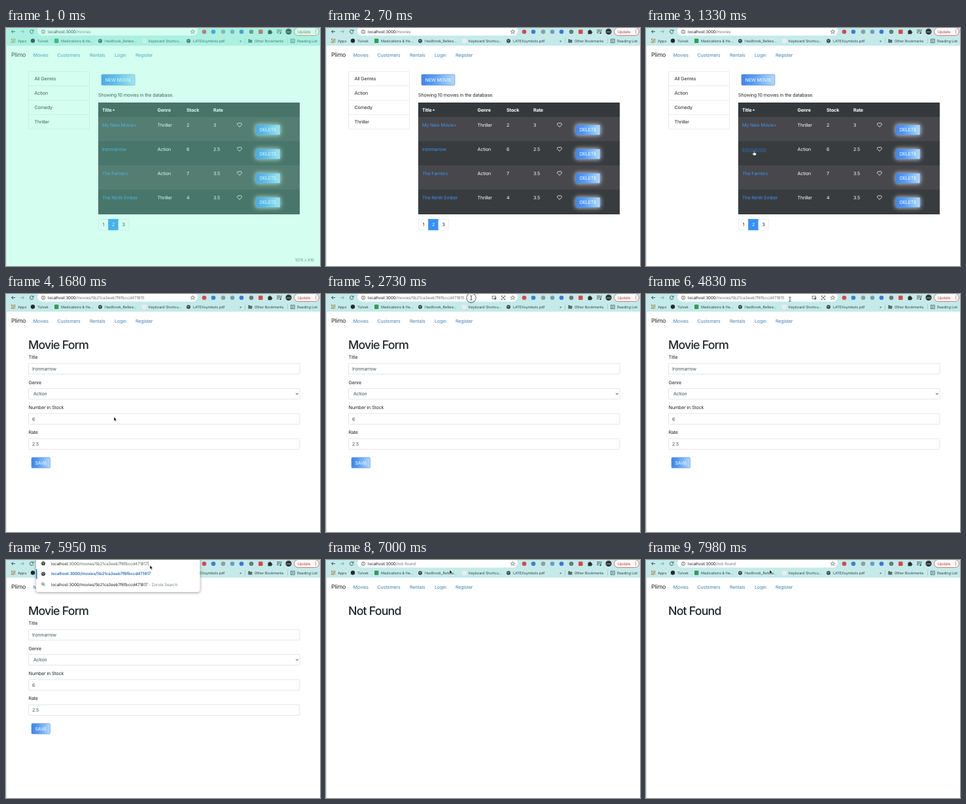
Animation, 480 px wide and 364 px high, one loop 8 s. Source, as an HTML page:

```html
<!DOCTYPE html>
<html lang="en">
<head>
<meta charset="utf-8">
<title>Movie list</title>
<style>
html, body { margin: 0; width: 100%; height: 100%; overflow: hidden; background: #fff; }
svg { display: block; width: 480px; height: 364px; }
text { font: 7.14px Inter, "Open Sans", sans-serif; letter-spacing: -.022em; fill: #212529; white-space: pre; text-rendering: geometricPrecision; }
.url { font-size: 6.3px; }
.mark { font-size: 5.64px; fill: #3c4a4d; }
.brand { font-size: 8.92px; }
.nav { fill: #4082b4; }
.link { fill: #3f93ee; }
.hover { fill: #2a6cb0; text-decoration: underline; }
.head { font-weight: 700; fill: #fff; }
.cell { fill: #fff; }
.h1 { font-size: 17.85px; font-weight: 500; letter-spacing: -.047em; }
.val { fill: #495057; }
.mid { text-anchor: middle; }
.glow { filter: drop-shadow(0 0 3.5px #fffc); }
.pop { filter: drop-shadow(0 1px 2px #0006); }
.line { fill: none; stroke: #3c4447; stroke-width: .9; }
</style>
</head>
<body>
<svg id="stage" viewBox="0 0 480 364">
  <defs>
    <linearGradient id="blue"><stop stop-color="#3d85ef"/><stop offset=".35" stop-color="#569cf3"/><stop offset="1" stop-color="#b2dbfb"/></linearGradient>
  </defs>
</svg>
<script>
const LOOP = 8000;
const FORM_AT = 1470, EDIT_AT = 5250, TYPE_AT = 5740, ENTER_AT = 6160, LOST_AT = 6930;
const HOST = 'localhost:3000', ITEM = '/movies/5b21ca3eeb7f6fbccd47181';
const FILM = 'Ironmarrow';
const stage = document.getElementById('stage');

const text = (x, y, str, cls = '', more = '') => `<text x="${x}" y="${y}" class="${cls}" ${more}>${str}</text>`;
const rect = (x, y, w, h, fill, more = '') => `<rect x="${x}" y="${y}" width="${w}" height="${h}" fill="${fill}" ${more}/>`;
const dot = (x, y, r, fill, more = '') => `<circle cx="${x}" cy="${y}" r="${r}" fill="${fill}" ${more}/>`;
const path = (d, more = 'class="line"') => `<path d="${d}" ${more}/>`;
const box = (x, y, w, h, stroke = '#ced4da', r = 1.5) => rect(x, y, w, h, '#fff', `rx="${r}" stroke="${stroke}" stroke-width=".6"`);
const button = (x, y, w, h, label, cls = '') =>
  rect(x, y, w, h, 'url(#blue)', `rx="1.5" stroke="#5c8fc4" stroke-width=".6" class="${cls}"`) +
  text(x + w / 2, y + h / 2 + 2.6, label, 'cell mid');
const globe = (x, y) => dot(x, y, 3, '#2f383a') +
  path(`M${x - 2} ${y - 1}l1.8 .8 .5 1.8M${x + .4} ${y - 2}l1.4 1.6`, 'fill="none" stroke="#d5eeee" stroke-width=".8"');

function add(html) {
  const g = document.createElementNS('http://www.w3.org/2000/svg', 'g');
  g.innerHTML = html;
  stage.append(g);
  return g;
}

// Show an element only inside the given [from, to] spans.
function during(el, ...spans) {
  const keys = [];
  const key = (t, opacity) => keys.push({ offset: t / LOOP, opacity, easing: 'step-end' });
  if (spans[0][0] > 0) key(0, 0);
  for (const [from, to] of spans) {
    key(from, 1);
    key(to, 0);
  }
  if (spans.at(-1)[1] < LOOP) key(LOOP, 0);
  el.animate(keys, { duration: LOOP, iterations: Infinity });
}

function toolbar() {
  const marks = [[18, 'Apps'], [48, 'Tulvek'], [84, 'Medications &amp; He...'], [151, 'HexBrook_Refere...'],
    [218, 'Keyboard Shortcu...'], [286, 'LATEXsymbols.pdf'], [357, '»'], [380, 'Other Bookmarks'], [445, 'Reading List']];
  const tools = [[303, '#d8474f'], [317, '#3f7fd0'], [332, '#8f9da3'], [346, '#6f9cc0'], [360, '#3c78d8'], [375, '#6b777b']];
  const grid = ['#d9534f', '#e0a030', '#4c9a5b'];
  let s = rect(0, 0, 480, 27, '#c5eaea') + rect(48, -3, 245, 14.5, '#fff', 'rx="7"');
  s += path('M14 5.5H8.5m2.5-2.5l-2.6 2.5 2.6 2.5');
  s += path('M22 5.5h5.5m-2.5-2.5l2.6 2.5-2.6 2.5', 'fill="none" stroke="#8aa3a5" stroke-width=".9"');
  s += path('M41.4 4a2.7 2.7 0 1 0 .4 2.3M42 2.4v2.2h-2.2');
  s += dot(57, 5.7, 2.7, 'none', 'class="line" style="stroke-width:.7"') + rect(56.6, 5.2, .8, 2, '#444') + rect(56.6, 3.9, .8, .8, '#444');
  s += path('M285.5 2.6l.9 2 2.2.2-1.7 1.4.6 2.2-2-1.2-2 1.2.6-2.2-1.7-1.4 2.2-.2z', 'class="line" style="stroke-width:.6"');
  s += tools.map(([x, c]) => dot(x, 5.7, 3.3, c)).join('') + rect(386, 2.4, 6.5, 6.5, '#d24a45', 'rx="1"');
  s += path('M400.5 3.8h2a1 1 0 1 1 1.9 0h1.6v1.9a1 1 0 1 1 0 1.9v1.6h-5.5z', 'fill="#2c3234"');
  s += path('M414 3h5M414 5.2h5M414 7.4h3M420.2 8V3h1.6') + dot(419.4, 8, 1.1, '#2c3234');
  s += dot(432, 5.5, 4.6, '#2f3234') + rect(428.5, 5, 7, 2, '#77706c', 'rx="1"');
  s += rect(440.5, -.5, 38, 12, '#f6fbfb', 'rx="6" stroke="#d5584e" stroke-width=".8"');
  s += text(445.5, 7.8, 'Update', '', 'style="font-size:6px;fill:#c8473e"');
  for (const y of [3.2, 5.5, 7.8]) s += dot(473.5, y, .65, '#c8473e');
  for (let i = 0; i < 9; i++) s += rect(8 + i % 3 * 2.3, 16.4 + (i / 3 | 0) * 2.3, 1.6, 1.6, grid[(i + (i / 3 | 0)) % 3]);
  s += dot(41, 19.5, 3.2, '#24292c') + rect(74, 16.2, 6.4, 6.8, '#2f9d5c', 'rx=".8"') + globe(144, 19.7) +
    rect(208, 16.4, 6.6, 6.6, '#e9eeee', 'rx=".5"') + globe(279, 19.7);
  s += rect(365, 15.5, .6, 8, '#97b8ba') + rect(430, 15.5, .6, 8, '#97b8ba');
  s += path('M370.3 17h2.2l.8 1h3v4.6h-6z', 'fill="#5a686b"');
  s += rect(435.3, 17, 5.8, 5.6, 'none', 'class="line" style="stroke-width:.7"') + path('M436.5 18.8h3.4M436.5 20.7h3.4', 'stroke="#3c4447" stroke-width=".6"');
  s += marks.map(([x, m]) => text(x, 21.7, m, 'mark')).join('');
  return s;
}

function navbar() {
  const items = [[41.5, 'Movies'], [78.5, 'Customers'], [128, 'Rentals'], [166, 'Login'], [198, 'Register']];
  return rect(0, 27, .7, 337, '#c3cccd') + text(8, 44, 'Plimo', 'brand') +
    items.map(([x, n]) => text(x, 43.5, n, 'nav')).join('');
}

function listPage() {
  const films = [['My New Movie+', 'Thriller', 2, 3], [FILM, 'Action', 6, 2.5],
    ['The Farriers', 'Action', 7, 3.5], ['The Ninth Ember', 'Thriller', 4, 3.5]];
  const cols = [147, 231.5, 276, 317];
  let s = box(34.5, 66.5, 93, 88, '#dfdfdf');
  ['All Genres', 'Action', 'Comedy', 'Thriller'].forEach((g, i) => {
    if (i) s += rect(34.5, 66.2 + i * 22, 93, .6, '#dfdfdf');
    s += text(43.5, 80.3 + i * 22, g);
  });
  s += button(146, 71, 51, 16.5, 'NEW MOVIE') + text(141, 105, 'Showing 10 movies in the database.');
  s += rect(141, 114, 308, 171, '#35393c');
  ['Title', 'Genre', 'Stock', 'Rate'].forEach((h, i) => s += text(cols[i], 128.3, h, 'head'));
  s += path('M162.6 126.2l2-2.2 2 2.2z', 'fill="#fff"');
  films.forEach((film, i) => {
    const y = 136 + i * 37;
    s += rect(141, y, 308, i < 3 ? 37 : 38, i % 2 ? '#393c3f' : '#48474b');
    film.forEach((v, c) => s += text(cols[c], y + 14.6, v, c ? 'cell' : 'link'));
    s += path(`M357 ${y + 15.4}l-3-3.1a1.8 1.8 0 0 1 3-2.3a1.8 1.8 0 0 1 3 2.3z`, 'fill="none" stroke="#fff" stroke-width=".8"');
    s += button(382, y + 12, 37, 15.5, 'DELETE', 'glow');
  });
  [1, 2, 3].forEach((n, i) => {
    const x = 141.3 + i * 15.3, on = n === 2;
    s += rect(x, 292.3, 15.3, 16.7, on ? '#3690f6' : '#fff', `stroke="${on ? '#3690f6' : '#dee2e6'}" stroke-width=".6"`);
    s += text(x + 7.6, 303.3, n, on ? 'cell mid' : 'mid');
  });
  return s;
}

function formPage() {
  const fields = [['Title', FILM], ['Genre', 'Action'], ['Number in Stock', 6], ['Rate', 2.5]];
  let s = text(34, 84, 'Movie Form', 'h1');
  fields.forEach(([label, value], i) => {
    const y = 106.2 + i * 38.35;
    s += text(34.5, y - 6.8, label) + box(34.5, y, 414.5, 16.3) + text(i === 1 ? 42 : 40, y + 10.8, value, 'val');
  });
  return s + path('M443.4 151.8l1.7 1.8 1.7-1.8', 'fill="none" stroke="#222" stroke-width="1"') +
    button(39, 250, 28.5, 16, 'SAVE');
}

const address = tail => text(64, 8, `${HOST}<tspan fill="#6b7275">${tail}</tspan>`, 'url');

function popup(id) {
  const full = HOST + id;
  return rect(46, -6, 250.5, 55, '#fff', 'rx="4" class="pop"') + rect(46, 14, 1.6, 15, '#3f7fdc') +
    globe(57, 5.2) + globe(57, 21.2) +
    dot(56.4, 36.6, 1.7, 'none', 'class="line"') + path('M57.7 38l1.8 1.8') +
    text(69, 7.8, `localhost<tspan fill="#5a6063">:3000${id}</tspan><tspan font-weight="300">|</tspan>`, 'url') +
    text(69, 23.4, full, 'url', 'style="font-weight:600;fill:#2f6db5"') +
    text(69, 39.6, `${full}<tspan fill="#7b8285"> - Zorvia Search</tspan>`, 'url');
}

add(rect(0, 0, 480, 364, '#fff') + toolbar() + navbar());
during(add(listPage()), [0, FORM_AT]);
during(add(rect(146, 180, 45, 10, '#393c3f') + text(147, 187.6, FILM, 'hover')), [1190, FORM_AT]);
during(add(formPage()), [FORM_AT, LOST_AT]);
during(add(text(34, 84, 'Not Found', 'h1')), [LOST_AT, LOOP]);

during(add(address('/movies')), [0, FORM_AT]);
during(add(address(ITEM + 5)), [FORM_AT, EDIT_AT]);
during(add(address(ITEM + 7)), [ENTER_AT, LOST_AT]);
during(add(address('/not-found')), [LOST_AT, LOOP]);
during(add(rect(254, 3.2, 5.4, 4, 'none', 'class="line" style="stroke-width:.7"') + rect(257.4, 5.5, 2.8, 3, '#5c6669') +
  path('M268.5 4.6V3h1.6M272 3h1.6v1.6M273.6 7v1.6h-1.6M270.1 8.6h-1.6V7M269.5 5.8h3.1M271 4.4v2.8')), [2450, 6510]);
during(add(popup(ITEM)), [EDIT_AT, TYPE_AT]);
during(add(popup(ITEM + 7)), [TYPE_AT, ENTER_AT]);

during(add(rect(0, 0, 480, 364, 'rgb(112 255 205 / .3)') +
  text(441.5, 357, '1076 x 816', '', 'style="font-size:6.2px;fill:#7f9a92"')), [0, 70]);

// Pointer: [time, x, y] of the hot spot.
const cursor = add('');
const moves = [[0, 150, 380], [500, 150, 380], [1190, 165, 188], [1680, 165, 188], [2100, 196, 80],
  [2520, 222, 6], [2870, 222, 6], [3220, 220, 8], [4830, 220, 8], [4970, 220, 9], [5250, 220, 8],
  [6510, 220, 8], [6580, 189, 15], [8000, 189, 15]];
cursor.animate(moves.map(([t, x, y]) => ({ offset: t / LOOP, transform: `translate(${x}px,${y}px)`, easing: 'ease-in-out' })),
  { duration: LOOP, iterations: Infinity });

function pointer(html, ...spans) {
  const g = add(html);
  cursor.append(g);
  during(g, ...spans);
}
const skin = 'stroke="#fff" stroke-width=".5"';
pointer(path('M0 0v6.2l1.4-1.3 1 2.2 1.1-.5-1-2.1h2z', `fill="#111" ${skin}`), [500, 1190], [1610, 2450], [EDIT_AT, LOOP]);
pointer(path('M-.7 0q.7-.8 1.4 0v2.6l2.4.7q.7.4.5 1.3l-.6 2.4h-3.6l-2.2-2.8q.3-1 1.2-.5l.9.6z', 'fill="#fff" stroke="#222" stroke-width=".6"'), [1190, 1610]);
pointer(path('M-1.5-3.4q1.5 0 1.5 1v4.8q0 1-1.5 1M1.5-3.4q-1.5 0-1.5 1M0 2.4q0 1 1.5 1', 'fill="none" stroke="#222" stroke-width=".8"'), [2450, EDIT_AT]);
pointer(dot(0, 0, 7.2, 'none', 'stroke="#333" stroke-width=".8"'), [2730, 2870]);
</script>
</body>
</html>
```
